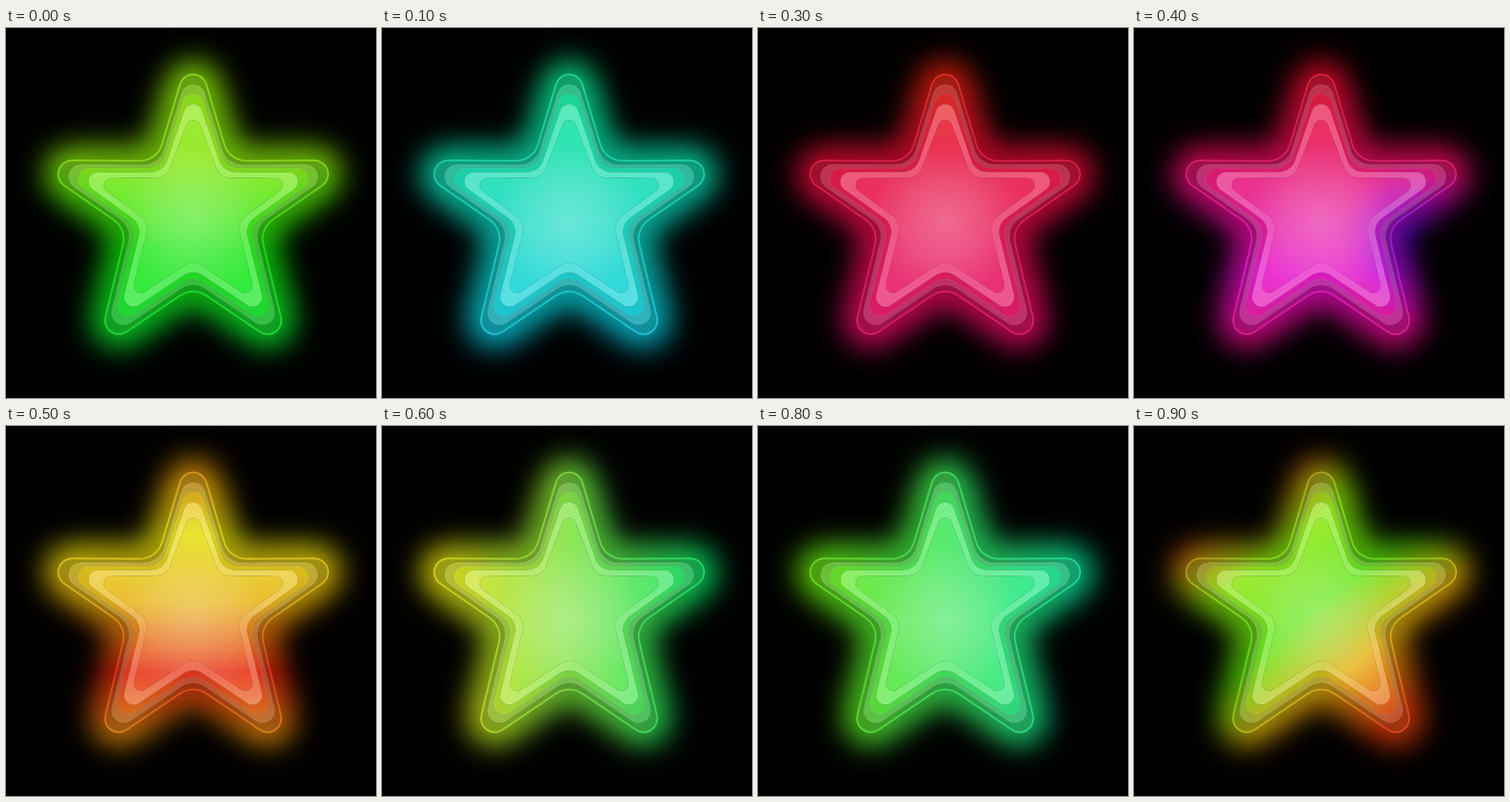
Recreate the animation shown at these times as an HTML page with a canvas. Size 512 by 512 pixels, loop 1000 ms.

```html
<!DOCTYPE html>
<html>
<head>
<meta charset="utf-8">
<style>
  html, body { margin: 0; height: 100%; overflow: hidden; background: #000; }
  canvas { display: block; }
</style>
</head>
<body>
<canvas id="stage" width="512" height="512"></canvas>
<script>
const SIZE = 512, CX = 259, CY = 245, REACH = 190, STEP = 100;
const ctx = document.getElementById('stage').getContext('2d');
const mix = (a, b, t) => a + (b - a) * t;
const white = a => `rgba(255,255,255,${a})`;
const tint = (h, a = 1) => `hsla(${h},92%,47%,${a})`;

// Left half of the largest and smallest star, from the top tip to the bottom notch
const OUTER = [[259, 17], [209, 184], [30, 183], [167, 278], [126, 448], [259, 358]];
const INNER = [[259, 109], [222, 207], [115, 208], [198, 269], [171, 379], [259, 321]];

function star(t) {
  const half = OUTER.map(([x, y], i) => [mix(x, INNER[i][0], t), mix(y, INNER[i][1], t)]);
  const right = half.slice(1, 5).reverse().map(([x, y]) => [2 * CX - x, y]);
  const pts = [...half, ...right];
  const path = new Path2D();
  const [a, b] = [pts[9], pts[0]];
  path.moveTo((a[0] + b[0]) / 2, (a[1] + b[1]) / 2);
  pts.forEach((p, i) => {
    const r = i % 2 ? mix(32, 20, t) : mix(19, 10, t);
    path.arcTo(...p, ...pts[(i + 1) % 10], r);
  });
  path.closePath();
  return path;
}

function layer() {
  const c = document.createElement('canvas');
  c.width = c.height = SIZE;
  return c.getContext('2d');
}

// Replaces what lies under the path
function put(g, path, alpha) {
  g.globalCompositeOperation = 'destination-out';
  g.fillStyle = '#000';
  g.fill(path);
  g.globalCompositeOperation = 'source-over';
  g.fillStyle = white(alpha);
  g.fill(path);
}

function line(g, path, alpha, width) {
  g.strokeStyle = white(alpha);
  g.lineWidth = width;
  g.stroke(path);
}

// The mask holds the colour strength, the veil the white on top
const mask = layer(), veil = layer();
const edge = star(0);
mask.filter = 'blur(20px)';
mask.globalAlpha = .7;
mask.lineWidth = 40;
mask.lineJoin = 'round';
mask.fill(edge);
mask.stroke(edge);
mask.filter = 'none';
mask.globalAlpha = 1;

// [inset, colour strength, white veil]
const BANDS = [[0, .68, .04], [.23, .78, .17], [.43, .92, .08], [.67, 1, .32], [1, 1, .16]];
for (const [inset, strength, light] of BANDS) {
  const path = star(inset);
  put(mask, path, strength);
  put(veil, path, light);
  if (inset === 0) line(mask, path, .7, 2.5);
  if (inset < 1) line(veil, path, .1, 1.5);
}
const core = veil.createRadialGradient(CX, 268, 0, CX, 268, 105);
core.addColorStop(0, white(.28));
core.addColorStop(.5, white(.16));
core.addColorStop(1, white(0));
veil.fillStyle = core;
veil.fill(star(1));

// Hues spread evenly across the star along an angle
const LOOKS = [
  { angle: 90, hues: [84, 86, 118, 130] },
  { angle: 90, hues: [156, 187] },
  { angle: 90, hues: [66, 28, 0, 0, 0] },
  { angle: 90, hues: [366, 348, 340, 335] },
  { angle: 90, hues: [352, 342, 325, 308, 325], spot: 265 },
  { angle: 90, hues: [38, 58, 45, 8, 36] },
  { angle: 0, hues: [58, 145] },
  { angle: 0, hues: [100, 128, 172, 216, 246] },
  { angle: 0, hues: [95, 160] },
  { angle: 51, hues: [25, 85, 98, 45, 14] }
];

function draw({ angle, hues, spot }) {
  const a = angle * Math.PI / 180, dx = REACH * Math.cos(a), dy = REACH * Math.sin(a);
  const field = ctx.createLinearGradient(CX - dx, CY - dy, CX + dx, CY + dy);
  hues.forEach((h, i) => field.addColorStop(i / (hues.length - 1), tint(h)));
  ctx.globalCompositeOperation = 'copy';
  ctx.fillStyle = field;
  ctx.fillRect(0, 0, SIZE, SIZE);
  ctx.globalCompositeOperation = 'source-over';
  if (spot) {
    const glow = ctx.createRadialGradient(390, 292, 0, 390, 292, 110);
    glow.addColorStop(0, tint(spot));
    glow.addColorStop(1, tint(spot + 20, 0));
    ctx.fillStyle = glow;
    ctx.fillRect(0, 0, SIZE, SIZE);
  }
  ctx.globalCompositeOperation = 'destination-in';
  ctx.drawImage(mask.canvas, 0, 0);
  ctx.globalCompositeOperation = 'source-over';
  ctx.drawImage(veil.canvas, 0, 0);
}

const start = performance.now();
function tick() {
  const t = Math.max(0, performance.now() - start);
  draw(LOOKS[Math.floor(t / STEP) % LOOKS.length]);
  requestAnimationFrame(tick);
}
tick();
</script>
</body>
</html>
```
